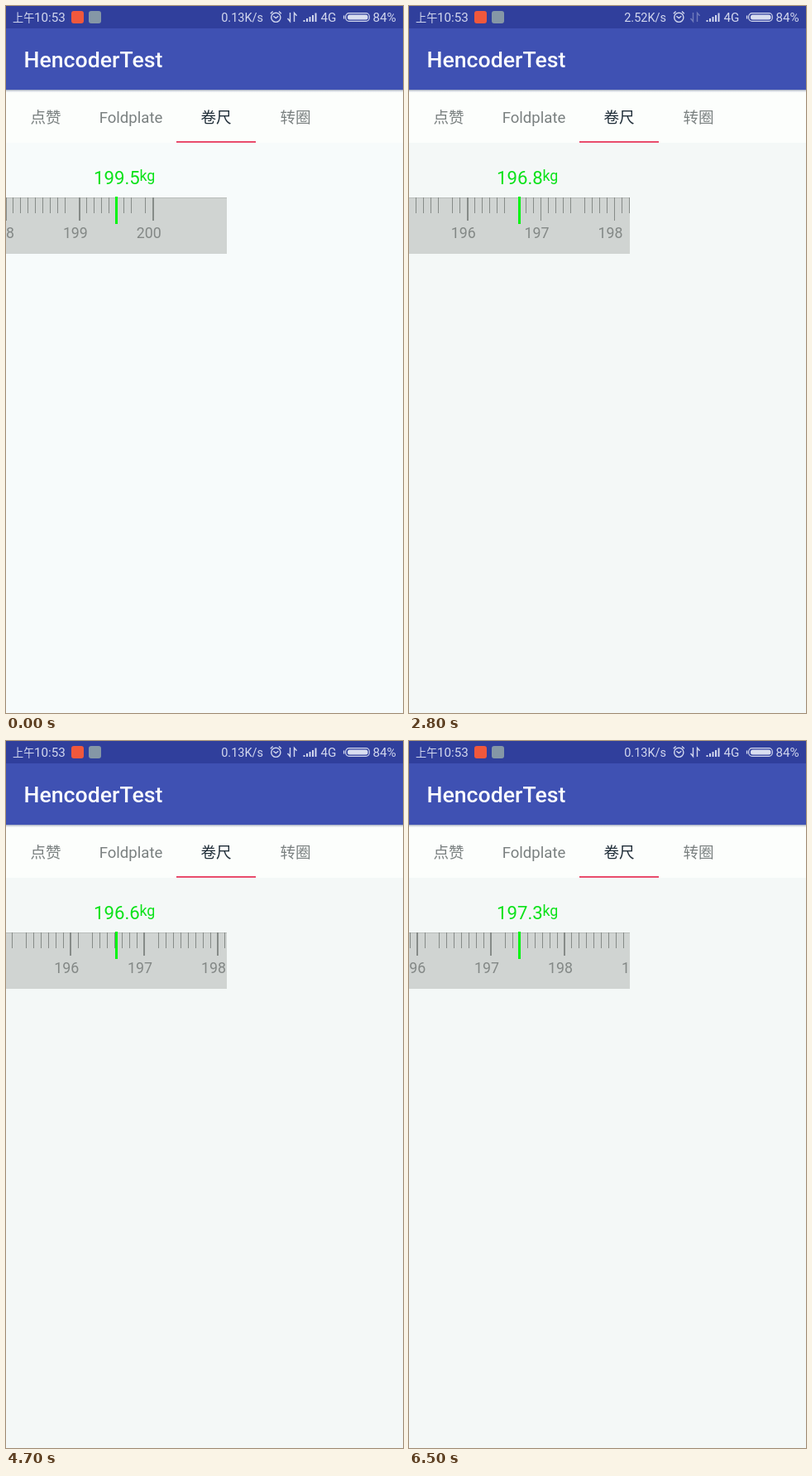
Animation, 480 px wide and 853 px high, one loop 6.6 s. Source, as an HTML page:

```html
<!DOCTYPE html>
<html lang="zh-CN">
<head>
<meta charset="utf-8">
<style>
  html, body { margin: 0; width: 100%; height: 100%; overflow: hidden; background: #f4f8f7; }
  svg { display: block; width: 480px; height: 853px; font-family: Roboto, "Noto Sans CJK SC", "Noto Sans CJK", sans-serif; }
  .status { fill: #d3d8ee; font-size: 15.2px; }
  .tab { fill: #7a8080; font-size: 18.6px; text-anchor: middle; }
  .green { fill: #0be219; }
</style>
</head>
<body>
<svg viewBox="0 0 480 853">
  <defs>
    <linearGradient id="shade" x2="0" y2="1">
      <stop offset="0" stop-color="#9aa3b8"/>
      <stop offset="1" stop-color="#fcfefd" stop-opacity="0"/>
    </linearGradient>
    <clipPath id="rulerClip"><rect y="230" width="267" height="69"/></clipPath>
  </defs>

  <rect id="page" width="480" height="853"/>
  <rect y="101" width="480" height="64" fill="#fcfefc"/>
  <rect y="27" width="480" height="74" fill="#3f51b3"/>
  <rect y="101" width="480" height="4" fill="url(#shade)"/>
  <rect width="480" height="27" fill="#303f9c"/>

  <g class="status">
    <text x="8" y="18.5" font-size="13.2">上午</text>
    <text x="34" y="19">10:53</text>
    <text id="speed" x="311" y="19" text-anchor="end" font-size="14.5" style="font-size:14.5px"></text>
    <text x="380.5" y="19">4G</text>
    <text x="443.5" y="19">84%</text>
  </g>
  <rect x="79" y="6" width="15" height="15" rx="3" fill="#f0583c"/>
  <rect x="100" y="6" width="15" height="15" rx="3" fill="#8597a6"/>
  <g fill="none" stroke="#d3d8ee" stroke-width="1.4">
    <circle cx="326.3" cy="13.8" r="5.6"/>
    <path d="M323.3 12.2l3 2.4 3-2.4M319.8 9.2l2.8-2.6M332.8 9.2l-2.8-2.6"/>
    <path id="arrows" d="M343.5 8v10.5l-3-3.5M348.5 19V8.3l3 3.5"/>
    <path d="M360.5 17v2M364 15v4M367.5 13v6M371 11v8M374.5 8.5v10.5" stroke-width="2"/>
    <rect x="410.7" y="8.7" width="28.6" height="9.6" rx="4" stroke-width="1.2"/>
    <path d="M408.6 11.5v4"/>
  </g>
  <rect x="413" y="10.5" width="24.5" height="6" rx="2.5" fill="#d9def0"/>

  <text x="21.5" y="74" fill="#fbfcff" font-size="26.67" font-weight="500">HencoderTest</text>
  <text class="tab" x="48" y="140.5">点赞</text>
  <text class="tab" x="151" y="140.5">Foldplate</text>
  <text class="tab" x="254" y="140.5" style="fill:#1f2d38">卷尺</text>
  <text class="tab" x="350" y="140.5">转圈</text>
  <rect x="206" y="163" width="96" height="2" fill="#e94c6c"/>

  <text id="value" class="green" x="106" y="215" font-size="22.2"></text>
  <text class="green" x="161.5" y="211" font-size="17.8">kg</text>
  <g clip-path="url(#rulerClip)">
    <rect y="231" width="267" height="68" fill="#d0d4d2"/>
    <rect y="231" width="267" height="1" fill="#b9bdba"/>
    <path id="ticks" fill="#868b88" shape-rendering="crispEdges"/>
    <g id="labels" fill="#838886" font-size="17.78"></g>
  </g>
  <rect x="132" y="230" width="3" height="33" fill="#00f411"/>
  <g id="touch">
    <circle r="15" fill="#f3f7f9" fill-opacity=".75" stroke="#a3afc0" stroke-opacity=".8" stroke-width="1.6"/>
    <circle r="7" fill="#dfe6e8" fill-opacity=".6"/>
  </g>
</svg>
<script>
const LOOP = 6600, STEP = 100;
const DEVICE_SCALE = 2.25;   // device pixels per stage pixel
const CENTER = 300, TICK_GAP = 20, MAX_TICK = 2000;

// [time, weight]
const weights = [
  [0, 199.5], [500, 199], [600, 198.9], [800, 198.9], [1200, 200], [2000, 200],
  [2400, 198.76], [2800, 196.705], [3200, 195.4], [3600, 194.5], [4000, 194.015],
  [4400, 195.14], [4700, 196.62], [5000, 196.75], [5400, 196.8], [5500, 196.8],
  [6300, 197.27], [6500, 197.385], [6600, 197.4]
];
// [time, x, y]
const strokes = [
  [[100, 110, 260], [500, 155, 262]],
  [[800, 215, 272], [1200, 121, 279], [1700, 71, 290]],
  [[2000, 90, 262], [2400, 200, 258]],
  [[4100, 200, 258], [4400, 100, 262]],
  [[5500, 173, 255], [6300, 130, 286]]
];

const $ = id => document.getElementById(id);
const labels = Array.from({ length: 5 }, () => {
  const label = document.createElementNS("http://www.w3.org/2000/svg", "text");
  label.setAttribute("y", 279.5);
  return $("labels").appendChild(label);
});

function interpolate(keys, t) {
  const i = Math.max(1, keys.findIndex(key => key[0] >= t));
  const [from, to] = [keys[i - 1], keys[i]];
  const p = (t - from[0]) / (to[0] - from[0]);
  return from.slice(1).map((a, n) => a + (to[n + 1] - a) * p);
}

const scrollAt = t => Math.round(interpolate(weights, t)[0] * TICK_GAP * 10);

// First stage column whose sampled device pixel is at or past x.
const column = x => Math.ceil(x / DEVICE_SCALE - 0.5);

function drawRuler(scroll) {
  const first = Math.ceil((scroll - CENTER - 40) / TICK_GAP);
  const last = Math.min(MAX_TICK, Math.floor((scroll + CENTER + 60) / TICK_GAP));
  let path = "", used = 0;
  for (let k = first; k <= last; k++) {
    const x = CENTER + k * TICK_GAP - scroll;
    const major = k % 10 === 0;
    const half = major ? 2 : 1;
    const left = column(x - half), width = column(x + half) - left;
    if (width > 0) path += `M${left} 231h${width}v${major ? 28 : 19}h${-width}z`;
    if (major) {
      const label = labels[used++];
      label.setAttribute("x", (x - 45) / DEVICE_SCALE);
      label.textContent = k / 10;
    }
  }
  labels.slice(used).forEach(label => label.textContent = "");
  $("ticks").setAttribute("d", path);
}

function drawTouch(t) {
  const stroke = strokes.find(s => t >= s[0][0] && t <= s[s.length - 1][0]);
  $("touch").style.display = stroke ? "" : "none";
  if (stroke) $("touch").setAttribute("transform", `translate(${interpolate(stroke, t)})`);
}

function render(time) {
  const t = Math.floor(time % LOOP / STEP) * STEP;
  const scroll = scrollAt(t);
  const falling = scroll < scrollAt(Math.max(0, t - STEP));
  const tenths = (falling ? Math.ceil : Math.floor)(scroll / TICK_GAP);
  drawRuler(scroll);
  drawTouch(t);
  $("value").textContent = (tenths / 10).toFixed(1);
  $("speed").textContent = t >= 300 && t < 4400 ? "2.52K/s" : "0.13K/s";
  const idle = (t >= 2600 && t < 3000) || (t >= 5300 && t < 5700);
  $("arrows").setAttribute("opacity", idle ? 0.4 : 1);
  $("page").setAttribute("fill", t < STEP ? "#f7fbfb" : "#f4f8f7");
}

const start = performance.now();
function tick() {
  render(performance.now() - start);
  requestAnimationFrame(tick);
}
tick();
</script>
</body>
</html>
```
